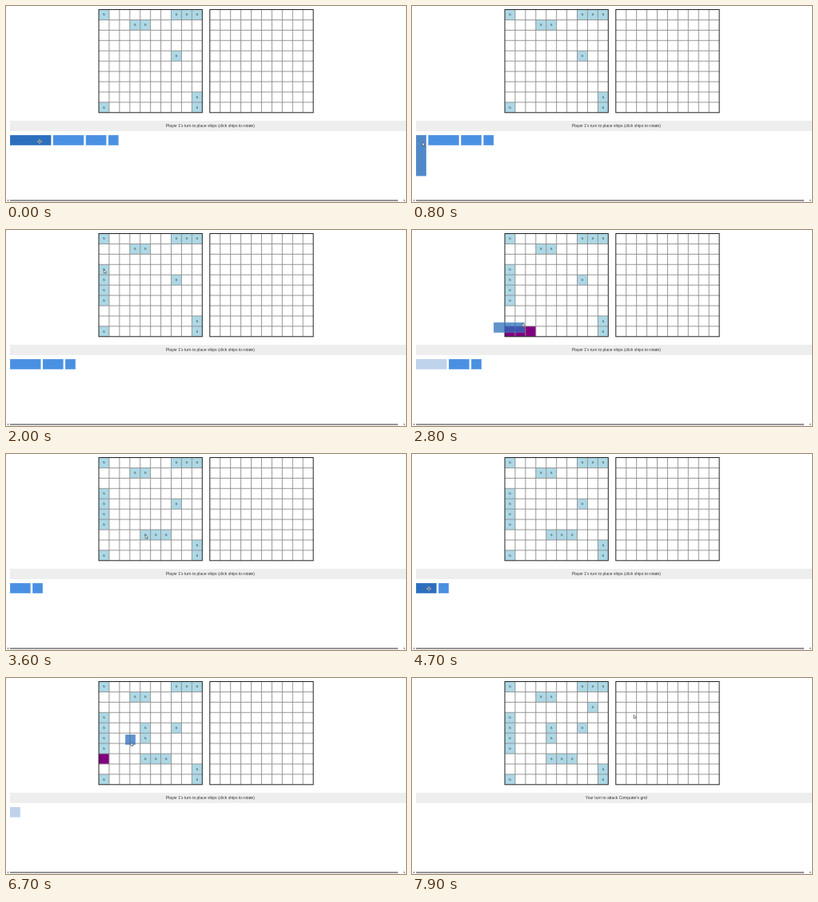
Animation of 500 by 246 pixels, one loop 8000 ms. Source, as an HTML page with a canvas:

```html
<!DOCTYPE html>
<html lang="en">
<head>
<meta charset="utf-8">
<title>Ship placement</title>
<style>
html, body { margin: 0; width: 100%; height: 100%; overflow: hidden; background: #fff; }
canvas { display: block; }
</style>
</head>
<body>
<canvas id="stage" width="500" height="246"></canvas>
<script>
const ctx = document.getElementById('stage').getContext('2d');
const LOOP = 8000, STEP = 100;
const CELL = 12.93, LEFT = 116, RIGHT = 254.8, TOP = 4.5;
const DOCK = { x: 5, y: 162, unit: 12.85, gap: 2.4 };
const BLUE = '#4a90e2', DEEP = '#2c6fbd';

// ships already on the board
const placed = [
  { size: 1, at: [0, 0] }, { size: 3, at: [7, 0] }, { size: 2, at: [3, 1] },
  { size: 1, at: [7, 4] }, { size: 2, at: [9, 8], spin: 0 }, { size: 1, at: [0, 9] }
];

// each ship is clicked to spin, lifted by its grab point, led past via, dropped on a cell
const ships = [
  { size: 4, spin: 400, click: [42, 170], lift: 800, grab: [8, 9],
    via: [[1400, 133, 62]], drop: 2000, at: [0, 3] },
  { size: 3, lift: 2500, grab: [36, 1],
    via: [[2800, 138, 117], [3150, 200, 105]], drop: 3500, at: [4, 7] },
  { size: 2, spin: 4900, click: [21, 169], lift: 5100, grab: [4, 11],
    via: [[5400, 160, 72], [5700, 170, 57]], drop: 5900, at: [4, 4] },
  { size: 1, lift: 6400, grab: [7, 10], via: [], drop: 7100, at: [8, 2] }
];

const center = ([col, row]) => [LEFT + (col + .5) * CELL, TOP + (row + .5) * CELL];
const upright = (ship, t) => t >= ship.spin;

// pointer stops as [time, x, y]
const stops = ships.flatMap(s => [
  ...(s.click ? [[s.spin - 400, ...s.click], [s.spin, ...s.click]] : []),
  [s.lift, DOCK.x + s.grab[0], DOCK.y + s.grab[1]],
  ...s.via,
  [s.drop, ...center(s.at)],
  [s.drop + STEP, ...center(s.at)]
]).concat([[7500, 284, 108], [7900, 277, 46], [LOOP, 277, 46]]);

function pointer(t) {
  const i = Math.max(1, stops.findIndex(s => s[0] > t));
  const [t0, x0, y0] = stops[i - 1], [t1, x1, y1] = stops[i];
  const left = 1 - Math.max(0, t - t0) / (t1 - t0), k = 1 - left * left;
  return [x0 + (x1 - x0) * k, y0 + (y1 - y0) * k];
}

function text(s, x, y, size) {
  ctx.font = size + 'px "Liberation Sans", Arial, sans-serif';
  ctx.textAlign = 'center';
  ctx.fillStyle = '#333';
  ctx.fillText(s, x, y);
}

function rect(x, y, w, h, color) {
  ctx.fillStyle = color;
  ctx.fillRect(x, y, w, h);
}

function line(x0, y0, x1, y1, width, color) {
  ctx.lineWidth = width;
  ctx.strokeStyle = color;
  ctx.beginPath();
  ctx.moveTo(x0, y0);
  ctx.lineTo(x1, y1);
  ctx.stroke();
}

function grid(x0) {
  const size = 10 * CELL;
  for (let i = 1; i < 10; i++) {
    const d = i * CELL;
    line(x0 + d, TOP, x0 + d, TOP + size, .9, '#8c8c8c');
    line(x0, TOP + d, x0 + size, TOP + d, .9, '#8c8c8c');
  }
  ctx.lineWidth = 1;
  ctx.strokeStyle = '#222';
  ctx.strokeRect(x0, TOP, size, size);
}

function cellsOf(ship, [col, row], t) {
  return Array.from({ length: ship.size },
    (_, i) => upright(ship, t) ? [col, row + i] : [col + i, row]);
}

function fillCell([col, row], color) {
  if (col < 0 || row < 0 || col > 9 || row > 9) return;
  rect(LEFT + col * CELL, TOP + row * CELL, CELL, CELL, color);
}

function drawBoards(t, held) {
  const fleet = placed.concat(ships.filter(s => t >= s.drop));
  for (const c of fleet.flatMap(s => cellsOf(s, s.at, t))) {
    const [x, y] = center(c);
    fillCell(c, '#add8e6');
    text('S', x, y + 1.5, 4.2);
  }
  // the drop preview trails the pointer by one step
  if (held && t > held.lift) {
    const [x, y] = pointer(t - STEP);
    const start = [Math.floor((x - LEFT) / CELL), Math.floor((y - TOP) / CELL)];
    if (start[0] >= 0 && start[1] < 10)
      for (const c of cellsOf(held, start, t)) fillCell(c, '#800080');
  }
  grid(LEFT);
  grid(RIGHT);
}

function drawShip(x, y, w, h, color, alpha) {
  ctx.save();
  ctx.globalAlpha = alpha;
  rect(x, y, w, h, color);
  ctx.strokeStyle = 'rgba(255,255,255,.4)';
  ctx.lineWidth = .6;
  ctx.setLineDash([1.2, 1.2]);
  ctx.strokeRect(x + .3, y + .3, w - .6, h - .6);
  ctx.restore();
}

// draws the waiting ships and the dragged one; tells whether the pointer is over a ship
function drawDock(t, held, px, py) {
  const { y, unit, gap } = DOCK;
  let x = DOCK.x, hover = false, ghost;
  for (const s of ships.filter(s => t < s.drop)) {
    const long = s.size * unit;
    const [w, h] = upright(s, t) ? [unit, long] : [long, unit];
    const over = !held && px >= x && px <= x + w && py >= y && py <= y + h;
    hover = hover || over;
    drawShip(x, y, w, h, over || s === held ? DEEP : BLUE, s === held ? .3 : 1);
    if (s === held) ghost = [px - s.grab[0], py - s.grab[1], w, h];
    x += w + gap;
  }
  if (ghost) drawShip(...ghost, DEEP, .75);
  return hover;
}

function moveIcon(x, y) {
  for (const [width, color] of [[1.6, '#fff'], [.7, '#222']]) {
    line(x - 2.8, y, x + 2.8, y, width, color);
    line(x, y - 2.8, x, y + 2.8, width, color);
  }
}

function polygon(x, y, points, color) {
  ctx.beginPath();
  for (const [dx, dy] of points) ctx.lineTo(x + dx, y + dy);
  ctx.closePath();
  ctx.fillStyle = color;
  ctx.fill();
}

function arrow(x, y) {
  const points = [[0, 0], [0, 4.6], [1.2, 3.6], [2.2, 5.2], [2.2, 3.3], [3.4, 3.2]];
  polygon(x, y, points, '#fff');
  ctx.lineWidth = .6;
  ctx.strokeStyle = '#444';
  ctx.stroke();
}

function draw(t) {
  const [px, py] = pointer(t);
  const held = ships.find(s => t >= s.lift && t < s.drop);
  const done = ships.every(s => t >= s.drop);
  rect(0, 0, 500, 246, '#fff');
  drawBoards(t, held);

  rect(5, 144, 495, 13, '#eee');
  text(done ? "Your turn to attack Computer's grid"
    : "Player 1's turn to place ships (click ships to rotate)", 255.3, 152, 5);

  const hover = drawDock(t, held, px, py);

  rect(5, 243.2, 485, 1.9, '#8b8b8b');
  polygon(1.5, 244, [[0, 0], [1.6, -1.2], [1.6, 1.2]], '#555');
  polygon(499, 244, [[0, 0], [-1.6, -1.2], [-1.6, 1.2]], '#555');

  (hover ? moveIcon : arrow)(px, py);
}

function tick() {
  const t = performance.now() % LOOP;
  draw(Math.floor(t / STEP) * STEP);
  requestAnimationFrame(tick);
}
tick();
</script>
</body>
</html>
```
